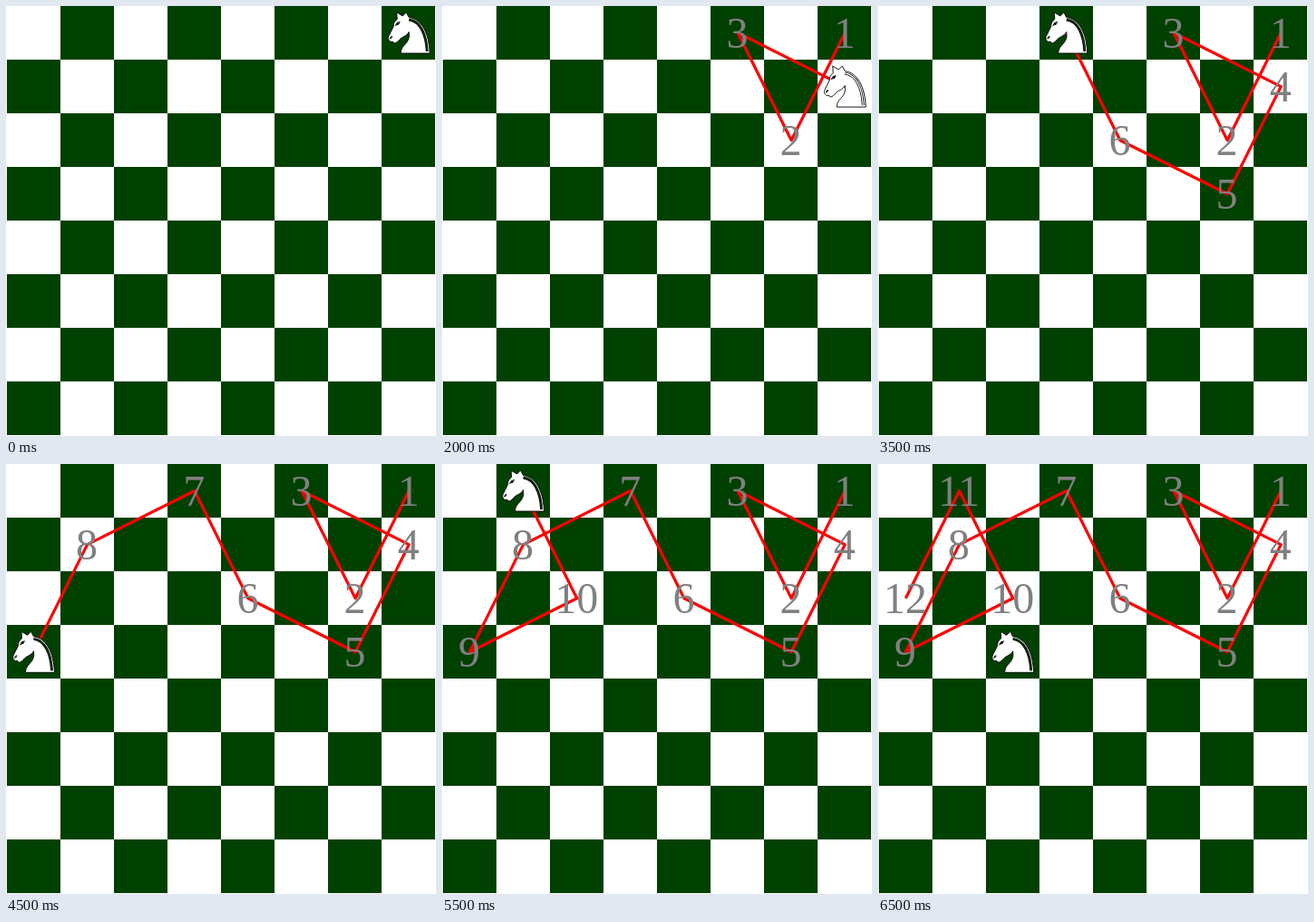
These frames come from a looping animation (474x473 px, 7.5 s). An HTML page with a canvas:

```html
<!DOCTYPE html>
<html lang="en">
<head>
<meta charset="utf-8">
<title>Knight's path</title>
<style>
  html, body { margin: 0; width: 100%; height: 100%; overflow: hidden; background: #fff; }
  canvas { display: block; width: 100%; height: 100%; }
</style>
</head>
<body>
<canvas width="474" height="473"></canvas>
<script>
const ctx = document.querySelector('canvas').getContext('2d');
const CELL = 59.1, LOOP = 7500, FIRST_HOLD = 1000, STEP = 500;
const GREEN = '#004000', WHITE = '#fff';

// Visited squares as [column, row]
const path = [[7, 0], [6, 2], [5, 0], [7, 1], [6, 3], [4, 2], [3, 0],
              [1, 1], [0, 3], [2, 2], [1, 0], [0, 2], [2, 3]];

const body = new Path2D(
  'M-9 22.5 C-9 15 -3 13 -1 8 C1 4 0 2 0 -1 C-3 4 -7 4 -10 7 ' +
  'C-12 9 -13 11 -16 11.5 L-18 9.5 L-20 10 C-23 8 -23.5 6 -22 3 ' +
  'L-17 -7 C-17.5 -11 -15 -13 -13 -15 L-13.5 -22.5 L-7 -18.5 L-3 -22.5 ' +
  'L0 -17 C14 -15 22 0 23 22.5 Z');
const mane = new Path2D('M0 -14.5 C12 -13 19 1 20 20.5');
const eye = new Path2D('M-15 -8 Q-14 -12 -10 -12 Q-11 -9 -15 -8 Z');
const nostril = new Path2D('M-21 6.5 Q-20.5 3.5 -18.5 4 Q-18.5 6 -21 6.5 Z');

const isDark = ([col, row]) => (col + row) % 2 === 1;
const center = ([col, row]) => [30.5 + col * CELL, 29.5 + row * CELL];

function stroke(shape, color, width) {
  ctx.strokeStyle = color;
  ctx.lineWidth = width;
  ctx.stroke(shape);
}

function drawBoard() {
  ctx.fillStyle = WHITE;
  ctx.fillRect(0, 0, 474, 473);
  ctx.fillStyle = GREEN;
  const edge = i => Math.floor(i * CELL);
  for (let row = 0; row < 8; row++) {
    for (let col = 0; col < 8; col++) {
      if (!isDark([col, row])) continue;
      const x = edge(col), y = edge(row);
      ctx.fillRect(x + 1, y, edge(col + 1) - x, edge(row + 1) - y);
    }
  }
}

function drawTrail(current) {
  const trail = new Path2D();
  const last = Math.min(current, path.length - 2); // the final jump leaves no line
  for (let i = 0; i <= last; i++) trail.lineTo(...center(path[i]));
  ctx.lineJoin = 'round';
  stroke(trail, '#f00', 3.2);

  ctx.font = '48px "Liberation Serif", serif';
  ctx.textAlign = 'center';
  ctx.fillStyle = '#808080';
  for (let i = 0; i < current; i++) {
    const [x, y] = center(path[i]);
    ctx.fillText(i + 1, x - 0.5, y + 16);
  }
}

function drawKnight(square) {
  ctx.save();
  ctx.translate(...center(square));
  ctx.fillStyle = WHITE;
  ctx.fill(body);
  ctx.lineJoin = 'miter';
  stroke(body, '#000', 0.9);
  stroke(mane, '#000', 2.8);
  stroke(mane, isDark(square) ? GREEN : WHITE, 1.2);
  stroke(eye, '#000', 0.9);
  stroke(nostril, '#000', 0.9);
  ctx.fillStyle = '#000';
  ctx.beginPath();
  ctx.arc(-12.2, -10, 1.3, 0, 7);
  ctx.fill();
  ctx.restore();
}

function frame(now) {
  const t = now % LOOP;
  const current = t < FIRST_HOLD ? 0
    : Math.min(path.length - 1, 1 + Math.floor((t - FIRST_HOLD) / STEP));
  drawBoard();
  drawTrail(current);
  drawKnight(path[current]);
  requestAnimationFrame(() => frame(performance.now() - start));
}

const start = performance.now();
frame(0);
</script>
</body>
</html>
```
